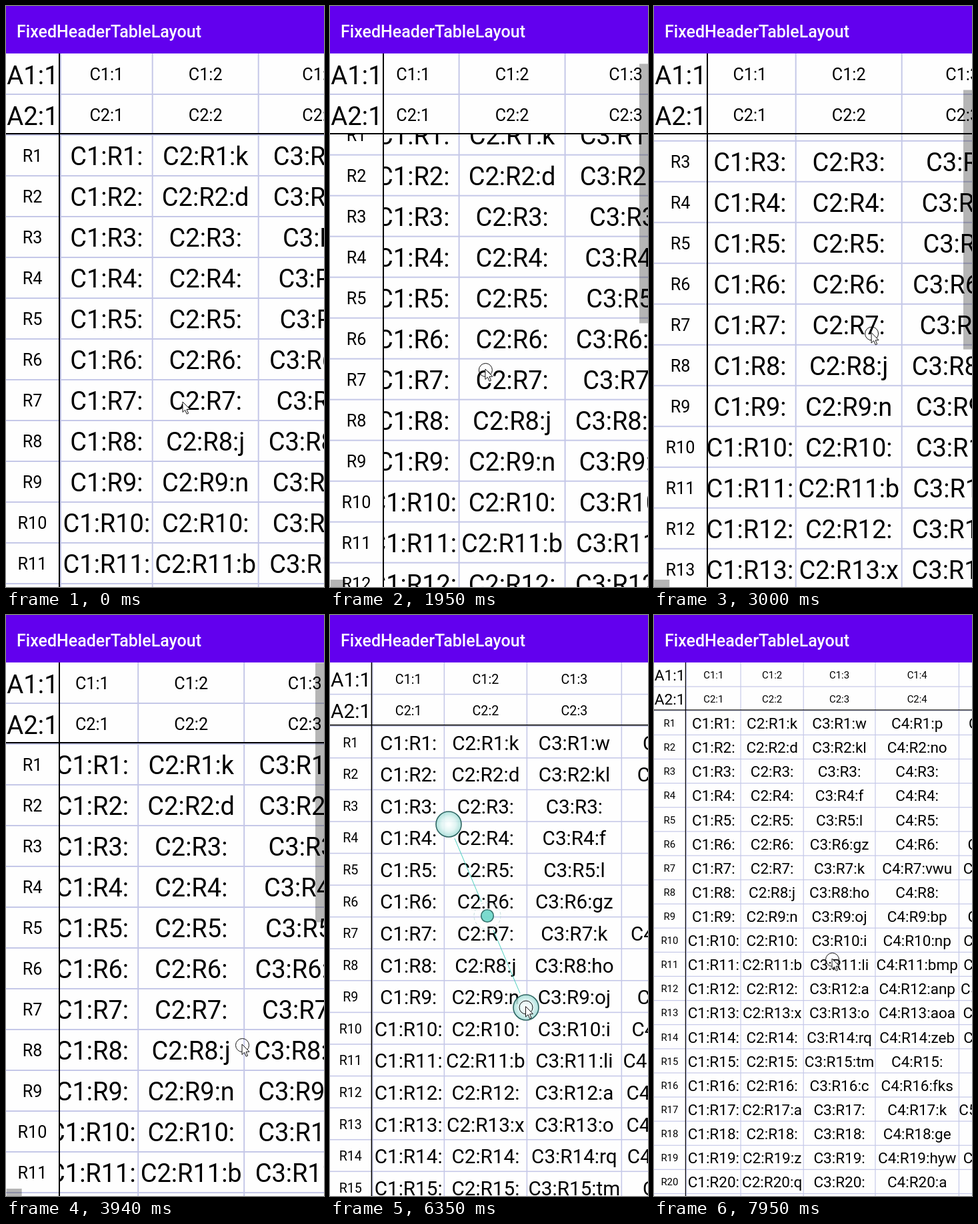
An HTML page with a canvas for the animation above (8000 ms loop, 477 px wide and 869 px high).

```html
<!DOCTYPE html>
<html lang="en">
<head>
<meta charset="utf-8">
<title>FixedHeaderTableLayout</title>
<style>
html, body { margin: 0; width: 100%; height: 100%; overflow: hidden; background: #fefefe; }
canvas { display: block; width: 477px; height: 869px; }
</style>
</head>
<body>
<canvas id="stage" width="477" height="869"></canvas>
<script>
const W = 477, H = 869, LOOP = 8000;
const BAR = 71, ROW = 61, HEAD = 122, SIDE = 81, ROWS = 26;
const EDGES = [82, 219.7, 378.7, 560.7, 772.7, 1008];
const PRESS = 880, DRAG = 1560, RELEASE = 4580, PINCH = 5200, LIFT = 7290, DONE = 7550;
const DRAG_STEP = 130, PINCH_STEP = 150;
const FOCUS = { x: 236, y: 450 };
const ctx = document.getElementById('stage').getContext('2d');

const SUFFIXES = [
  '',
  'k,d,,,,,,j,n,,b,,x,,,,a,,z,q',
  'w,kl,,f,l,gz,k,ho,oj,i,li,a,o,rq,tm,c,,,,',
  'p,no,,,,,vwu,,bp,np,bmp,anp,aoa,zeb,,fks,k,ge,hyw,a',
  'gfdu,ab,,t,,ehcn,wdmo,,hbse,ebas,nuce,mdhe,gobs,ubes,r,,wdmo,k,ebun,c'
].map(s => s.split(','));

// Turning points of the dragging finger: [time, position]
const FINGER_X = [[1370, 265.5], [1880, 232], [2820, 334], [3450, 290], [3770, 376], [4030, 333], [RELEASE, 355]];
const FINGER_Y = [[1370, 593.5], [1860, 539.5], [2360, 603.5], [3170, 475], [3840, 643.5]];

// Half distance between the pinching fingers, and the table's scale
const SPREAD_X = [[PINCH, 82], [5750, 77.5], [6350, 58], [6880, 41.5]];
const SPREAD_Y = [[PINCH, 188], [5750, 180.5], [6350, 137], [6880, 108]];
const SCALE = [[5750, 1], [6350, 0.78], [6880, 0.592]];

const clamp = v => Math.min(1, Math.max(0, v));
const lerp = (a, b, k) => a + (b - a) * k;
const swing = k => (1 - Math.cos(Math.PI * k)) / 2;

function follow(keys, t, ease = k => k) {
  let i = 0;
  while (i < keys.length - 2 && t >= keys[i + 1][0]) i++;
  const [t0, a] = keys[i], [t1, b] = keys[i + 1];
  return lerp(a, b, ease(clamp((t - t0) / (t1 - t0))));
}

const finger = t => ({ x: follow(FINGER_X, t, swing), y: follow(FINGER_Y, t, swing) });

// The screen is refreshed in coarse steps, a little slower while pinching.
function hold(t) {
  if (t < DRAG) return t < PRESS ? 0 : PRESS;
  if (t < PINCH) return t - (t - DRAG) % DRAG_STEP;
  return Math.max(PINCH, t - (t - 5750 + 10 * PINCH_STEP) % PINCH_STEP);
}

// The offset follows the finger after the touch slop and stops at the table's edge.
function scrollAt(t) {
  let x = 0, y = 0, last = { x: 259.5, y: 575.5 };
  for (let time = DRAG; time <= Math.min(t, RELEASE); time += DRAG_STEP) {
    const p = finger(time);
    x = Math.max(0, x + last.x - p.x);
    y = Math.max(0, y + last.y - p.y);
    last = p;
  }
  return { x, y };
}

function stateAt(now) {
  const t = hold(now);
  const scroll = scrollAt(t);
  const s = { scroll, scale: 1, pinch: null, bars: 0 };
  s.pressed = (now >= PRESS && now < RELEASE) || (now >= 5470 && now < LIFT) || now >= 7950;
  if (t < PINCH) {
    const k = clamp((t - RELEASE) / 360);
    const p = finger(t);
    s.cursor = { x: lerp(p.x, 318, k), y: lerp(p.y, 638, k) };
    s.bars = t >= DRAG ? 0.29 * clamp((4940 - t) / 390) : 0;
    return s;
  }
  // Scale around the focus, but never past the left edge.
  s.scale = follow(SCALE, t);
  const anchor = FOCUS.x - SIDE + scroll.x;
  scroll.x = Math.max(0, anchor * s.scale - (FOCUS.x - SIDE * s.scale));
  if (now < DONE) {
    s.pinch = { x: follow(SPREAD_X, t), y: follow(SPREAD_Y, t) };
    s.cursor = { x: FOCUS.x + s.pinch.x, y: FOCUS.y + s.pinch.y };
  } else {
    const k = clamp((t - DONE) / PINCH_STEP);
    s.cursor = { x: lerp(271.5, 267.5, k), y: lerp(522, 515.5, k) };
  }
  return s;
}

function rect(x, y, w, h, color) {
  ctx.fillStyle = color;
  ctx.fillRect(x, y, w, h);
}

function label(text, x, middle, size) {
  ctx.font = `${size}px Roboto, sans-serif`;
  ctx.textAlign = 'center';
  ctx.fillStyle = '#000';
  ctx.fillText(text, x, middle + size * 0.3925);
}

function pane(x, y, dx, dy, right, bottom, draw) {
  ctx.save();
  ctx.beginPath();
  ctx.rect(x, y, right - x, bottom - y);
  ctx.clip();
  ctx.translate(-dx, -dy);
  draw();
  ctx.restore();
}

function rowLines(from, to, width) {
  for (let i = from; i <= to; i++) rect(0, i * ROW - 1, width, 2, '#c5c8e8');
}

function columnLines(height) {
  for (const x of EDGES) rect(x - 1, 0, 2, height, '#c5c8e8');
}

const center = c => (EDGES[c] + EDGES[c + 1]) / 2;
const middle = r => (r + 0.5) * ROW;

function drawTable({ scale, scroll }) {
  const dx = scroll.x / scale, dy = scroll.y / scale;
  const right = W / scale, bottom = (H - BAR) / scale;
  const far = EDGES[EDGES.length - 1], deep = (ROWS + 2) * ROW;
  ctx.save();
  ctx.translate(0, BAR);
  ctx.scale(scale, scale);

  pane(SIDE, HEAD - 2, dx, dy, right, bottom, () => {
    rowLines(2, ROWS, far);
    columnLines(deep);
    SUFFIXES.forEach((words, c) => {
      for (let r = 1; r <= ROWS; r++)
        label(`C${c + 1}:R${r}:${words[r - 1] || ''}`, center(c), middle(r + 1), 38);
    });
  });

  pane(SIDE, 0, dx, 0, right, HEAD - 1, () => {
    rowLines(1, 1, far);
    columnLines(HEAD);
    SUFFIXES.forEach((_, c) => {
      for (const r of [0, 1]) label(`C${r + 1}:${c + 1}`, center(c), middle(r), 25.2);
    });
  });

  pane(0, HEAD - 2, 0, dy, SIDE, bottom, () => {
    rowLines(2, ROWS, SIDE);
    for (let r = 1; r <= ROWS; r++) label('R' + r, 39.5, middle(r + 1), 25.2);
  });

  pane(0, 0, 0, 0, SIDE, HEAD, () => {
    rowLines(1, 1, SIDE);
    for (const r of [0, 1]) label(`A${r + 1}:1`, 40, middle(r), 38.3);
  });

  rect(0, HEAD - 3, right, 2, '#000');
  rect(79, 0, 2, bottom, '#000');
  ctx.restore();
}

function drawBars({ scroll, bars }) {
  if (!bars) return;
  const color = `rgba(0,0,0,${bars})`;
  rect(464, 71.5 + scroll.y * 0.478, 13, 388, color);
  rect(scroll.x * 0.03, 858, 23, 11, color);
}

function circle(x, y, r, fill, stroke, width) {
  ctx.beginPath();
  ctx.arc(x, y, r, 0, Math.PI * 2);
  if (fill) {
    ctx.fillStyle = fill;
    ctx.fill();
  }
  ctx.strokeStyle = stroke;
  ctx.lineWidth = width;
  ctx.stroke();
}

function drawPinch({ pinch }) {
  if (!pinch) return;
  const length = Math.hypot(pinch.x, pinch.y);
  const ux = pinch.x / length, uy = pinch.y / length;
  for (const side of [-1, 1]) {
    const at = d => [FOCUS.x + side * ux * d, FOCUS.y + side * uy * d];
    ctx.beginPath();
    ctx.moveTo(...at(23));
    ctx.lineTo(...at(length - 23));
    ctx.strokeStyle = '#4dd0bf';
    ctx.lineWidth = 1;
    ctx.stroke();
    const [x, y] = at(length);
    const glow = ctx.createRadialGradient(x, y, 2, x, y, 19);
    glow.addColorStop(0, 'rgba(250,255,254,0.9)');
    glow.addColorStop(0.5, 'rgba(222,244,242,0.87)');
    glow.addColorStop(1, 'rgba(160,220,213,0.85)');
    circle(x, y, 19, glow, '#2f6663', 1.6);
  }
  ctx.setLineDash([4, 3]);
  circle(FOCUS.x, FOCUS.y, 20, null, '#c3dedd', 1);
  ctx.setLineDash([]);
  circle(FOCUS.x, FOCUS.y, 9.3, 'rgba(112,216,202,0.92)', '#34746e', 1.6);
}

const ARROW = new Path2D('M0 0V15.5L3.6 12.2 6.2 18.2 8.6 17.2 6.1 11.4 11 11.2Z');

function drawCursor({ cursor, pressed }) {
  if (pressed) circle(cursor.x, cursor.y, 10, null, '#111', 1);
  ctx.save();
  ctx.translate(cursor.x - 0.5, cursor.y - 1.5);
  ctx.fillStyle = '#fff';
  ctx.fill(ARROW);
  ctx.strokeStyle = '#111';
  ctx.lineWidth = 1;
  ctx.stroke(ARROW);
  ctx.restore();
}

function drawTitle() {
  rect(0, 0, W, BAR, '#6200ee');
  ctx.font = '500 25px Roboto, sans-serif';
  ctx.textAlign = 'left';
  ctx.fillStyle = '#fff';
  ctx.fillText('FixedHeaderTableLayout', 16, 46.5);
}

function render(t) {
  const state = stateAt(t);
  rect(0, 0, W, H, '#fefefe');
  drawTable(state);
  drawTitle();
  drawBars(state);
  drawPinch(state);
  drawCursor(state);
}

// Draw slightly ahead, since a picture is seen one refresh after it is drawn.
const LEAD = 12;

function loop() {
  render((performance.now() + LEAD) % LOOP);
  requestAnimationFrame(loop);
}
loop();
</script>
</body>
</html>
```
